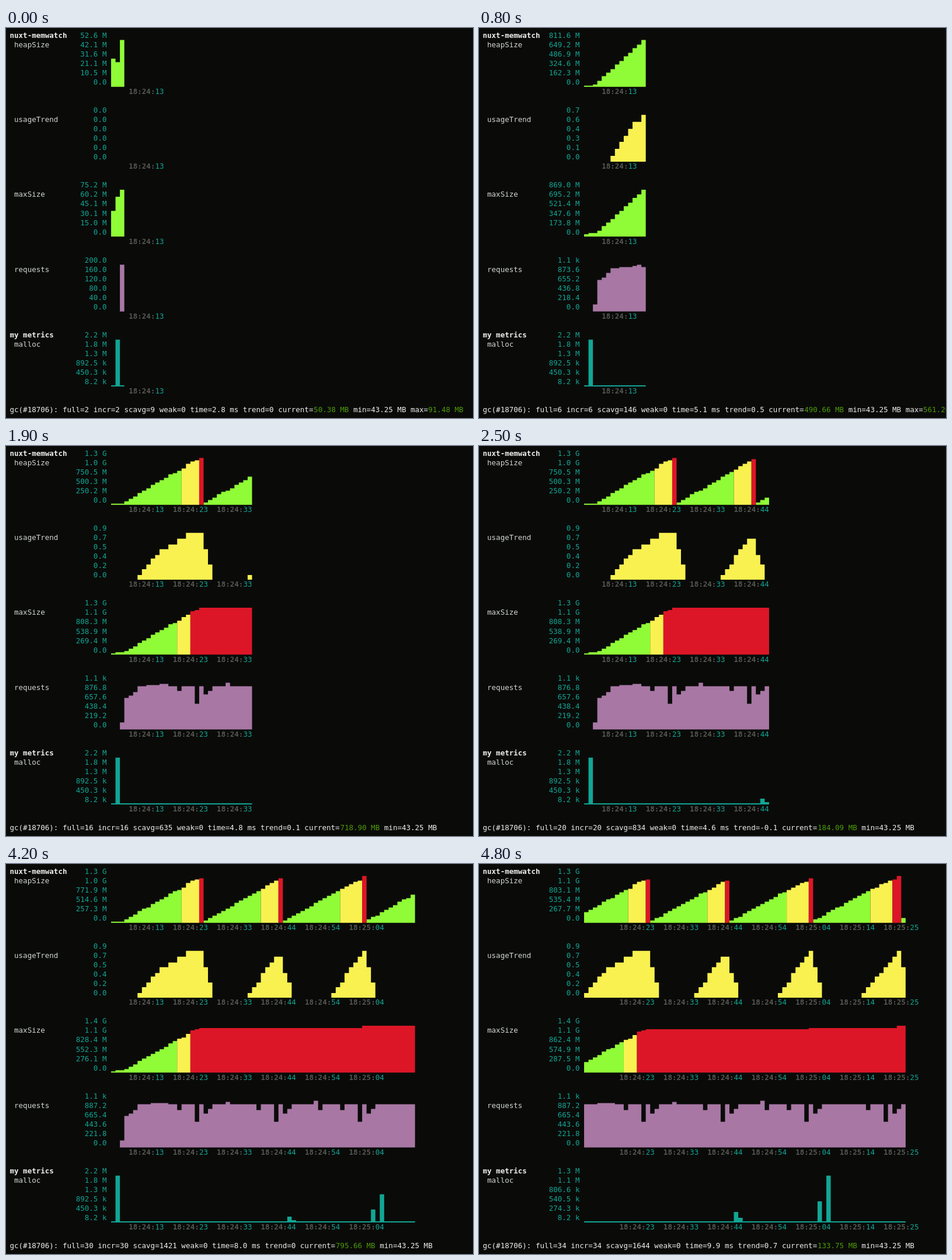
Write an HTML page with a canvas that moves like this. It is 800 px wide and 668 px high and loops after 4.9 s.

```html
<!DOCTYPE html>
<html lang="en">
<head>
<meta charset="utf-8">
<title>Memory dashboard</title>
<style>
html, body { margin: 0; width: 100%; height: 100%; overflow: hidden; background: #0a0b09; }
canvas { display: block; }
</style>
</head>
<body>
<canvas id="stage" width="800" height="668"></canvas>
<script>
const ctx = document.getElementById('stage').getContext('2d');
const LOOP = 4900, STEP = 100, COLS = 73;
const CW = 7.545, CH = 16.04, X0 = 6.5, Y0 = 4.4, BASELINE = 12.35;
const FONT = '12.53px "DejaVu Sans Mono", monospace';
const GREEN = '#90fc37', YELLOW = '#f9f150', RED = '#dc1627', PURPLE = '#a877a4', TEAL = '#12a594';
const WHITE = '#eeeeec', GREY = '#d3d7cf', DIM = '#555753', VALUE = '#4e9a06';
const MB = 2 ** 20;

const lerp = (a, b, u) => a + (b - a) * u;

// Straight lines through [x, y] points
function curve(points, x) {
  let i = 1;
  while (i < points.length - 1 && x > points[i][0]) i++;
  const [x0, y0] = points[i - 1], [x1, y1] = points[i];
  return lerp(y0, y1, (x - x0) / (x1 - x0));
}

// Heap in MB: a sawtooth that falls back after every collection
const heapPoints = [
  [0, 31.6], [1, 28.5], [2, 52.64], [3, 105], [13, 811.56], [16, 1000], [18, 1180], [20, 1250.8],
  [21, 65], [38, 1236],
  [39, 70], [52, 960], [56, 1190], [57, 1286.5],
  [58, 100], [71, 990], [75, 1210], [77, 1338.5], [78, 140]
];
const peakPoints = [
  [0, 43], [1, 64.5], [2, 75.2], [3, 118], [13, 869], [17, 1155], [18, 1270], [20, 1347.2],
  [56, 1347.2], [57, 1380.7], [76, 1380.7], [77, 1437.3], [78, 1437.3]
];
const trendPoints = [
  [5, 0], [10, 0.5], [13, 0.7], [18, 0.9], [20, 0.9], [23, 0],
  [30, 0], [37, 0.8], [38, 0.8], [41, 0],
  [49, 0], [57, 0.9], [60, 0],
  [68, 0], [77, 0.9], [80, 0]
];
const loadPoints = [
  [1, 0], [2, 200], [3, 749], [5, 890], [6, 1035], [12, 1092], [13, 1046],
  [25, 1046], [26, 1096], [27, 1046], [45, 1046], [46, 1109], [47, 890], [48, 1046], [78, 1046]
];
const spikes = { 1: 2218850, 40: 316000, 41: 160000, 59: 623000, 61: 1338850 };

const heap = i => curve(heapPoints, i) * 1e6;
const peak = i => curve(peakPoints, i) * 1e6;
const trend = i => Math.max(0, Math.round(curve(trendPoints, i) * 10) / 10);
const malloc = i => spikes[i] || 8200;

// Requests stall around each collection
const stall = { '-5': 0.86, '-1': 0.6, 1: 0.8, 2: 0.88 };
function requests(i) {
  const slow = [20, 38, 57, 75].map(gc => stall[i - gc] || 1);
  return Math.max(0, curve(loadPoints, i)) * Math.min(...slow);
}

const heat = v => v > 1220e6 ? RED : v > 943e6 ? YELLOW : GREEN;

const charts = [
  { name: 'heapSize', title: 'nuxt-memwatch', value: heap, color: heat },
  { name: 'usageTrend', value: trend, color: () => YELLOW },
  { name: 'maxSize', value: peak, color: heat },
  { name: 'requests', value: requests, color: () => PURPLE },
  { name: 'malloc', title: 'my metrics', value: malloc, color: () => TEAL, min: 8200 }
];

const samplePoints = [[0, 3], [8, 14], [13, 23], [48, 79]];

// Key moments of the status line
const stats = [
  { at: 0, full: 2, scavg: 9, ms: 2.8, trend: 0, current: 50.38 },
  { at: 8, full: 6, scavg: 146, ms: 5.1, trend: 0.5, current: 490.66 },
  { at: 13, full: 12, scavg: 435, ms: 5, trend: 0.2, current: 165.49 },
  { at: 25, full: 20, scavg: 834, ms: 4.6, trend: -0.1, current: 184.09 },
  { at: 34, full: 23, scavg: 1075, ms: 7.1, trend: 0.4, current: 945.28 },
  { at: 42, full: 30, scavg: 1421, ms: 8, trend: 0, current: 795.66 },
  { at: 48, full: 34, scavg: 1644, ms: 9.9, trend: 0.7, current: 133.75 }
];

function text(str, col, row, color, bold) {
  ctx.font = (bold ? 'bold ' : '') + FONT;
  ctx.fillStyle = color;
  ctx.fillText(str, X0 + col * CW, Y0 + row * CH + BASELINE);
}

function unit(v) {
  if (v >= 1e9) return (v / 1e9).toFixed(1) + ' G';
  if (v >= 1e6) return (v / 1e6).toFixed(1) + ' M';
  if (v >= 1e3) return (v / 1e3).toFixed(1) + ' k';
  return v.toFixed(1);
}

// Bar height in rows, snapped to block characters
function barRows(v, min, max) {
  if (v <= 0) return 0;
  const rows = (v - min) / (max - min) * 5;
  const full = Math.floor(rows);
  return Math.max(1 / 8, full + Math.round((rows - full) * 7) / 8);
}

function drawBars({ value, color, min = 0 }, row, first, n, max) {
  const base = Y0 + (row + 6) * CH;
  const paths = {};
  for (let i = first; i < n; i++) {
    const v = value(i), h = barRows(v, min, max) * CH;
    const path = paths[color(v)] ||= new Path2D();
    if (h) path.rect(X0 + (23 + i - first) * CW, base - h, CW, h);
  }
  for (const c in paths) {
    ctx.fillStyle = c;
    ctx.fill(paths[c]);
  }
}

function drawTimes(row, first, n) {
  for (let k = 0; k < 8; k++) {
    const at = 4 + 10 * k - first;
    if (at < 0 || (k && n < 10.3 + 9.8 * k)) continue;
    const sec = 13 + Math.floor(10.3 * k + 0.1);
    text(`18:${sec < 60 ? 24 : 25}:`, 23 + at, row, DIM, true);
    text(String(sec % 60).padStart(2, '0'), 29 + at, row, TEAL);
  }
}

function drawChart(chart, row, n) {
  const first = Math.max(0, n - COLS), min = chart.min || 0;
  let max = 0;
  for (let i = first; i < n; i++) max = Math.max(max, chart.value(i));
  if (chart.title) text(chart.title, 0, row, WHITE, true);
  text(chart.name, 1, row + 1, GREY);
  for (let i = 0; i < 6; i++) {
    const label = unit(lerp(max, min, i / 5));
    text(label, 22 - label.length, row + i, TEAL);
  }
  drawBars(chart, row, first, n, max);
  drawTimes(row + 6, first, n);
}

function drawStatus(frame, n) {
  let i = 0;
  while (i < stats.length - 2 && frame >= stats[i + 1].at) i++;
  const a = stats[i], b = stats[i + 1];
  // The line refreshes only when another full collection has run.
  const full = Math.floor(lerp(a.full, b.full, (frame - a.at) / (b.at - a.at)) + 1e-6);
  const u = (full - a.full) / (b.full - a.full);
  const key = u === 0 ? a : u === 1 ? b : { trend: trend(n - 1), current: heap(n - 1) / MB };
  const early = n <= 14;
  const parts = [
    `gc(#18706): full=${full} incr=${full} scavg=${Math.round(lerp(a.scavg, b.scavg, u))}` +
    ` weak=0 time=${lerp(a.ms, b.ms, u).toFixed(1)} ms trend=${key.trend} current=`,
    key.current.toFixed(2) + ' MB',
    ' min=43.25 MB'
  ];
  // The maximum wraps out of sight when the line is too long.
  if (early || parts.join('').length + 9 <= 104) {
    parts[2] += ' max=';
    parts.push(early ? lerp(91.48, 561.2, (n - 3) / 11).toFixed(2) + ' MB'
      : (peak(n - 1) / MB / 1024).toFixed(2));
  }
  let col = 0;
  parts.forEach((part, k) => {
    text(part, col, 40, k % 2 ? VALUE : WHITE);
    col += part.length;
  });
}

function draw(frame) {
  ctx.fillStyle = '#0a0b09';
  ctx.fillRect(0, 0, 800, 668);
  const n = Math.floor(curve(samplePoints, frame));
  charts.forEach((chart, k) => drawChart(chart, k * 8, n));
  drawStatus(frame, n);
}

const start = performance.now();
function tick() {
  draw(Math.floor((performance.now() - start) % LOOP / STEP));
  requestAnimationFrame(tick);
}
tick();
</script>
</body>
</html>
```
